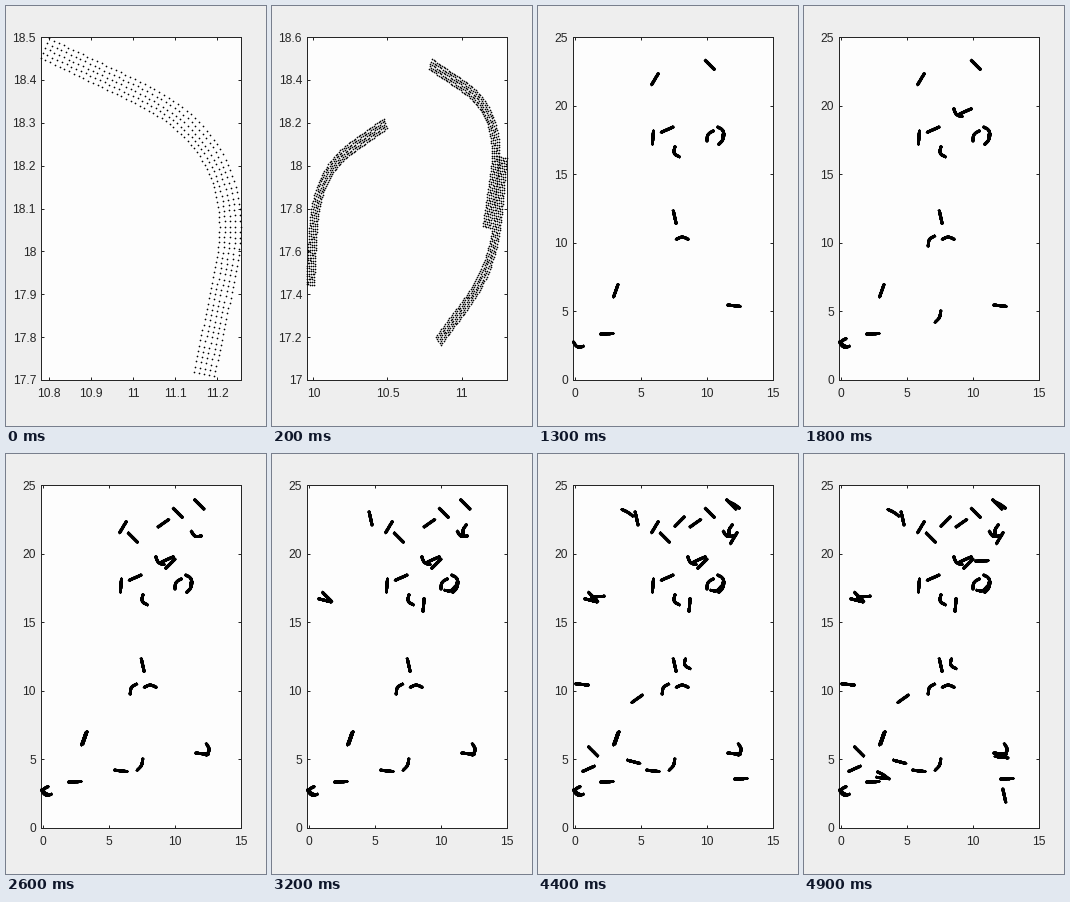
Animation of 260 by 420 pixels, one loop 5 s. Source, as a matplotlib script:

```python
import numpy as np
import matplotlib.pyplot as plt
from matplotlib.animation import FuncAnimation
from matplotlib.ticker import FormatStrFormatter, MultipleLocator

WIDTH, HEIGHT, DPI = 260, 420, 100
PX = 72 / DPI  # points per pixel
INK = "#262626"

# Heading at the centre and, for curved shapes, the total bend, in degrees.
SHAPES = {
    "flat": (3,), "dip": (-6,), "glide": (-14,), "gentle": (23,),
    "slope": (34,), "climb": (44,), "steep": (58,), "lean": (70,),
    "upright": (85,), "drop": (-77,), "fall": (-44,), "descend": (-30, -12),
    "sweep": (-63.5, -77), "bow": (63, 40), "arch": (56, -60),
    "hook": (-65, 80), "cup": (-23, 70), "scoop": (-40, 60),
    "bowl": (22, 60), "hollow": (-104, 50), "cap": (0, -50),
    "cee": (-90, 130), "paren": (-90, -65),
}
# Shape and centre of each ribbon, in order of appearance.
RIBBONS = [
    ("sweep", 11.198, 18.203), ("bow", 11.18, 17.55), ("arch", 10.07, 17.93),
    ("upright", 5.87, 17.7), ("hook", 7.5, 16.57), ("flat", 2.36, 3.4),
    ("cup", 0.13, 2.46), ("fall", 10.2, 23.0), ("steep", 6.03, 21.97),
    ("dip", 12.05, 5.45), ("lean", 3.05, 6.55), ("gentle", 6.95, 18.28),
    ("drop", 7.53, 11.9), ("cap", 8.1, 10.45), ("scoop", 8.74, 19.38),
    ("gentle", 9.42, 19.62), ("arch", 6.67, 10.27), ("bow", 7.43, 4.6),
    ("cee", -0.02, 2.76), ("fall", 11.83, 23.62), ("slope", 9.1, 22.25),
    ("cup", 11.53, 21.3), ("climb", 9.63, 19.3), ("lean", 3.13, 6.6),
    ("paren", 12.57, 5.75), ("fall", 6.78, 21.2), ("dip", 5.87, 4.2),
    ("drop", 4.63, 22.6), ("hollow", 11.66, 21.75), ("upright", 8.66, 16.3),
    ("bowl", 10.75, 17.35), ("glide", 1.15, 16.63), ("fall", 1.32, 16.88),
    ("slope", 4.66, 9.45), ("fall", 1.32, 5.62), ("gentle", 0.97, 4.35),
    ("flat", 12.55, 3.62), ("descend", 12.05, 23.62), ("dip", 0.48, 10.5),
    ("climb", 7.9, 22.37), ("steep", 12.02, 21.17), ("hook", 8.3, 11.92),
    ("glide", 4.4, 4.86), ("descend", 3.95, 23.05), ("flat", 1.68, 16.9),
    ("dip", 12.15, 5.2), ("descend", 3.15, 3.92), ("dip", 3.13, 3.68),
    ("drop", 12.36, 2.4), ("flat", 10.65, 19.5),
]


def integrate(values, step):
    total = np.concatenate([[0], np.cumsum((values[1:] + values[:-1]) / 2) * step])
    return total - total[len(total) // 2]


def ribbon_dots(x, y, heading, bend=0, columns=81, rows=5, width=0.05):
    s = np.linspace(0, 1, columns)
    u = np.clip((s - 0.2) / 0.6, 0, 1)
    angle = np.radians(heading + bend * (u * u * (3 - 2 * u) - 0.5))
    centre_x = x + integrate(np.cos(angle), s[1])
    centre_y = y + integrate(np.sin(angle), s[1])
    offset = np.linspace(-width / 2, width / 2, rows)[:, None]
    return np.array([(centre_x - offset * np.sin(angle)).ravel(),
                     (centre_y + offset * np.cos(angle)).ravel()])


def tick_step(low, high, most):
    steps = (0.1, 0.2, 0.5, 1, 2, 5)
    return next(step for step in steps if (high - low) / step <= most)


dots = [ribbon_dots(x, y, *SHAPES[shape]) for shape, x, y in RIBBONS]

plt.rcParams["font.family"] = "Liberation Sans"
fig = plt.figure(figsize=(WIDTH / DPI, HEIGHT / DPI), dpi=DPI, facecolor="#eeeeee")
ax = fig.add_axes([34.5 / WIDTH, 1 - 374 / HEIGHT, 200 / WIDTH, 343 / HEIGHT],
                  facecolor="#fdfdfd")
ax.tick_params(direction="in", top=True, right=True, length=3 * PX, width=PX,
               color=INK, labelcolor=INK, labelsize=12 * PX)
ax.tick_params(axis="x", pad=8 * PX)
ax.tick_params(axis="y", pad=4.5 * PX)
for spine in ax.spines.values():
    spine.set(linewidth=PX, color=INK)
for axis in (ax.xaxis, ax.yaxis):
    axis.set_major_formatter(FormatStrFormatter("%g"))
trail, = ax.plot([], [], "o", color="black", markersize=1.7 * PX,
                 markeredgewidth=0, clip_on=False, zorder=3)


def update(frame):
    x, y = np.hstack(dots[:frame + 1])
    trail.set_data(x, y)

    left, right = x.min(), x.max()
    if right > 12:
        right = 15
    ax.set_xlim(left, right)
    ax.xaxis.set_major_locator(MultipleLocator(tick_step(left, right, 5)))

    step = tick_step(y.min(), y.max(), 9)
    ax.set_ylim(np.floor(y.min() / step) * step, np.ceil(y.max() / step) * step)
    ax.yaxis.set_major_locator(MultipleLocator(step))
    return trail,


animation = FuncAnimation(fig, update, frames=len(dots), interval=100,
                          repeat=True, repeat_delay=0, blit=False)
plt.show()
```
